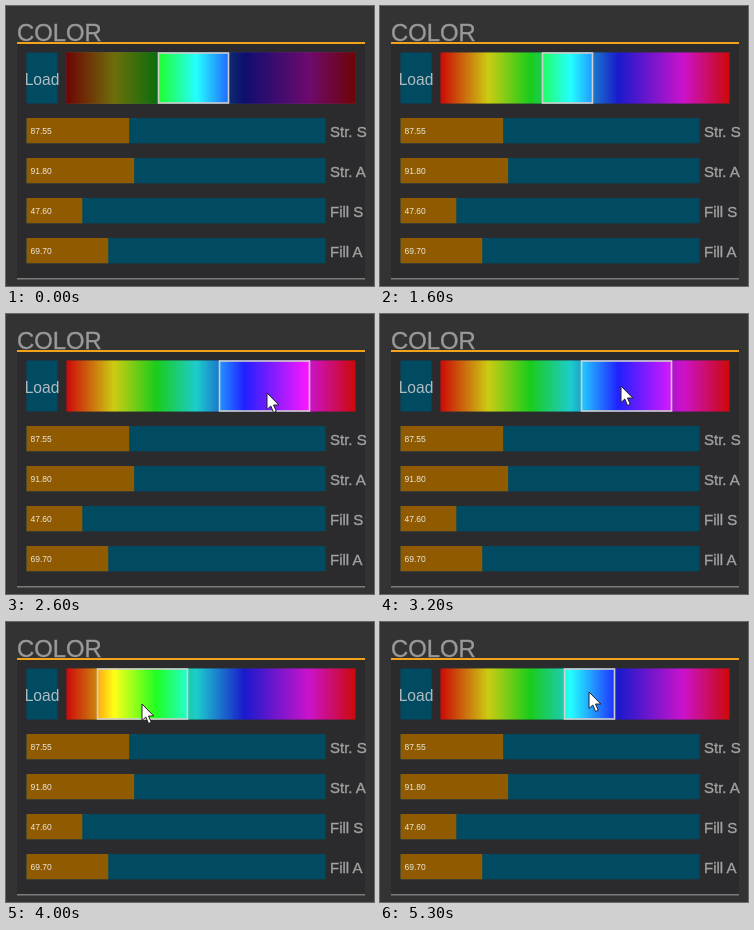
These frames come from a looping animation (368 by 280 pixels, 5600 ms). An HTML page:

```html
<!DOCTYPE html>
<html lang="en">
<head>
<meta charset="utf-8">
<title>Color panel</title>
<style>
  html, body { margin: 0; width: 100%; height: 100%; overflow: hidden; background: #333; }
  svg { display: block; width: 368px; height: 280px; }
  text { font: 15px "Liberation Sans", Arial, sans-serif; fill: #a2a2a2; stroke: #a2a2a2; stroke-width: .35px; }
  .title { font-size: 23.8px; fill: #9a9a9a; stroke: #9a9a9a; }
  .load { font-size: 15.6px; fill: #b0bbc0; stroke: none; text-anchor: middle; }
  .value { font-size: 8.5px; fill: #ece8e0; stroke: none; }
  .track { fill: #004b62; }
  .level { fill: #905b00; }
  .strip { fill: url(#hues); }
</style>
</head>
<body>
<svg viewBox="0 0 368 280">
  <defs>
    <linearGradient id="hues"></linearGradient>
    <clipPath id="window"><rect id="hole" y="47" height="50"/></clipPath>
  </defs>
  <rect width="368" height="280" fill="#333"/>
  <rect x="11" y="38" width="348" height="234" fill="#2b2b2e"/>
  <rect x="11" y="36" width="348" height="2" fill="#f4a21c"/>
  <rect x="11" y="272" width="348" height="1.5" fill="#7c7c7c"/>
  <text class="title" x="11" y="35">COLOR</text>

  <rect class="track" x="20.5" y="46.5" width="31" height="51"/>
  <text class="load" x="36" y="79">Load</text>

  <rect class="strip" x="60.5" y="46.5" width="289" height="51"/>
  <rect id="shade" x="60.5" y="46.5" width="289" height="51"/>
  <rect class="strip" x="60.5" y="46.5" width="289" height="51" clip-path="url(#window)"/>
  <rect id="frame" y="47" height="50" fill="none" stroke="#cfcfcf" stroke-width="1.6"/>

  <g id="sliders"></g>
  <path id="cursor" d="M0 0V16.5L3.8 13L6.6 19.5L9.3 18.3L6.5 12H11.8Z"
        fill="#fff" stroke="#222" stroke-width="1"/>
</svg>
<script>
  const LOOP = 5600, STEP = 100, LEAD = 35, ENTER = 1700;
  const el = id => document.getElementById(id);
  const set = (id, attrs) => {
    for (const name in attrs) el(id).setAttribute(name, attrs[name]);
  };

  // Red, yellow, green, cyan, blue, magenta, red
  el('hues').innerHTML = [0, .165, .31, .45, .615, .84, 1].map((offset, i) => {
    const light = 52 + 5 * Math.sin(Math.PI * i / 6);
    return `<stop offset="${offset}" stop-color="hsl(${i * 60},100%,${light}%)"/>`;
  }).join('');

  const sliders = [['Str. S', 87.55], ['Str. A', 91.8], ['Fill S', 47.6], ['Fill A', 69.7]];
  el('sliders').innerHTML = sliders.map(([name, value], i) => {
    const y = 112 + i * 40;
    return `<rect class="track" x="20.5" y="${y}" width="299" height="25.3"/>
      <rect class="level" x="20.5" y="${y}" width="${value / 255 * 299}" height="25.3"/>
      <text class="value" x="24.5" y="${y + 16}">${value.toFixed(2)}</text>
      <text x="324" y="${y + 19}">${name}</text>`;
  }).join('');

  // Key points as [time, value], eased in between
  const bright = [[200, .43], [600, .8]];
  const width = [[800, 70], [1100, 50], [1600, 50], [2100, 90], [4500, 90], [5100, 50]];
  const center = [[ENTER, 187], [2900, 271], [4000, 136], [5200, 208.5]];
  const height = [[2600, 79], [3200, 72], [4000, 82], [5200, 70]];

  function at(keys, t) {
    const next = keys.findIndex(key => key[0] > t);
    if (next === 0) return keys[0][1];
    if (next < 0) return keys[keys.length - 1][1];
    const [t0, a] = keys[next - 1], [t1, b] = keys[next];
    const u = (t - t0) / (t1 - t0);
    return a + (b - a) * u * u * (3 - 2 * u);
  }

  function draw(now) {
    const t = Math.floor(now % LOOP / STEP) * STEP;
    const w = Math.round(at(width, t));
    const x = Math.round(at(center, t) - w / 2) + .5;
    set('hole', { x, width: w });
    set('frame', { x, width: w });
    set('shade', { opacity: 1 - at(bright, t) });

    // The selection trails slightly behind the pointer
    const px = Math.round(at(center, t + LEAD)), py = Math.round(at(height, t));
    set('cursor', {
      transform: `translate(${px} ${py})`,
      visibility: t < ENTER ? 'hidden' : 'visible'
    });
  }

  const start = performance.now();
  function tick() {
    draw(performance.now() - start);
    requestAnimationFrame(tick);
  }
  tick();
</script>
</body>
</html>
```
